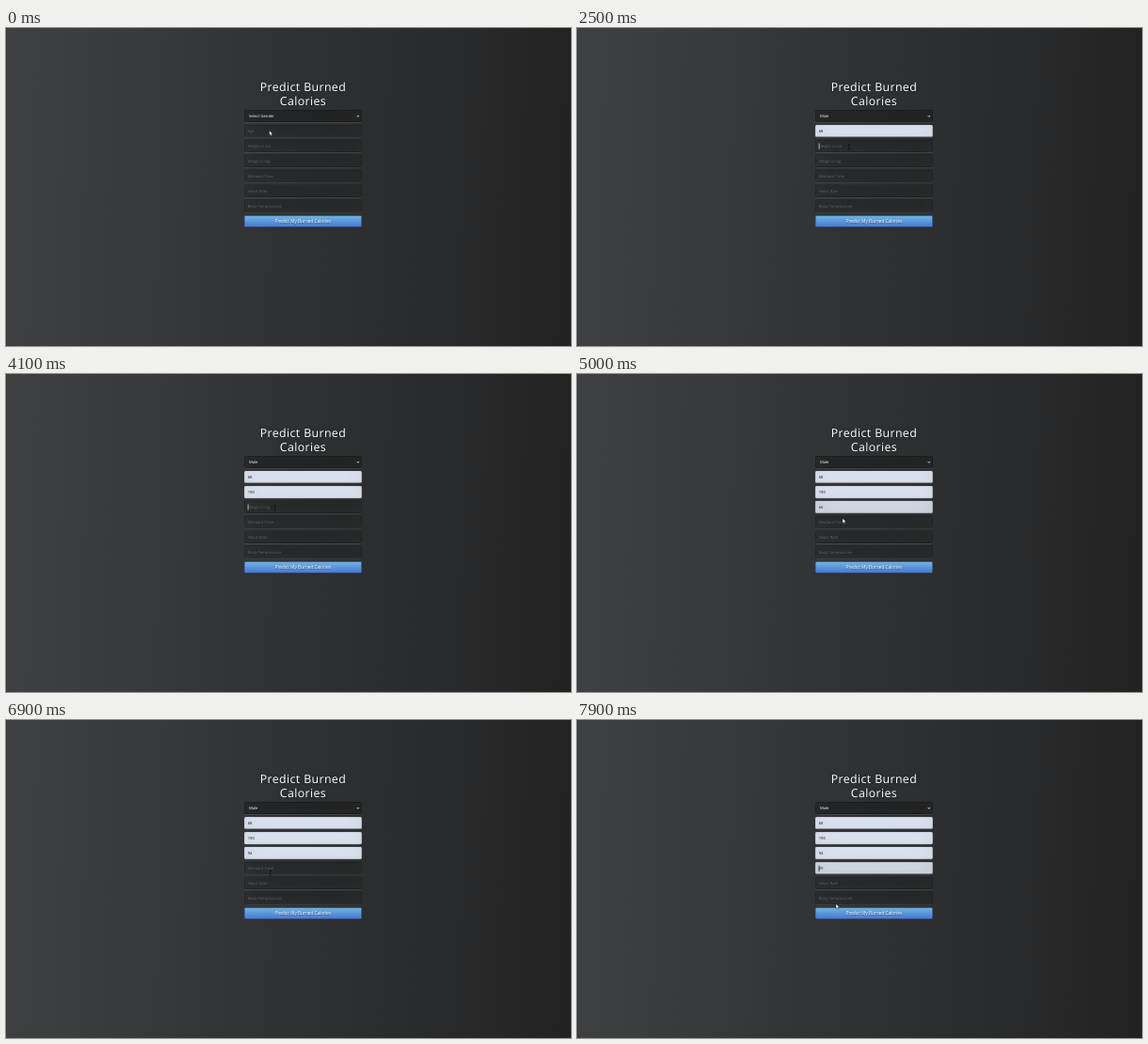
These frames come from a looping animation (600x338 px, 8000 ms). An HTML page:

```html
<!DOCTYPE html>
<html lang="en">
<head>
<meta charset="utf-8">
<title>Predict Burned Calories</title>
<style>
html, body { margin: 0; width: 100%; height: 100%; overflow: hidden; }
body {
  background: linear-gradient(92deg, #3f4042, #38393b 25%, #2f3133 50%, #2a2b2c 75%, #222223);
  font-family: "Open Sans", sans-serif;
}
/* The page is laid out at 1440 wide and shown at 600. */
#page {
  position: absolute; left: 0; top: 0; width: 1440px; height: 811px;
  transform: scale(.4166667); transform-origin: 0 0;
  text-rendering: geometricPrecision;
}
h1 {
  position: absolute; left: 607px; top: 130.5px; width: 300px; margin: 0;
  font-size: 29.5px; line-height: 36px; font-weight: 400; letter-spacing: 1px;
  text-align: center; white-space: nowrap; color: #fff;
  text-shadow: 0 0 10px rgba(0,0,0,.3);
}
.field, button {
  position: absolute; left: 607px; width: 300px; height: 31.5px;
  box-sizing: border-box; border: 1px solid rgba(0,0,0,.3); border-radius: 4px;
}
.field {
  display: flex; align-items: center; padding: 1px 8px 0;
  font-size: 10px; color: #626264; background: rgba(0,0,0,.3);
  box-shadow: inset 0 -5px 45px rgba(100,100,100,.2), 0 1px 1px rgba(255,255,255,.2);
}
.field.select { color: #fff; font-weight: 500; padding-left: 11px; background: rgba(0,0,0,.42); }
.field.preview { background: #dbe2ee; color: #252b36; }
.field.filled { background: #e8f0fe; color: #15181d; }
.caret { position: absolute; left: 8px; top: 8px; width: 1.6px; height: 15px; background: #c4c4c6; }
.preview .caret { background: #20242c; }
.chevron { position: absolute; right: 5px; top: 12px; width: 8px; height: 6px; }
button {
  top: 477.5px; height: 30px; padding: 0; border-color: #3762bc;
  background: linear-gradient(#6eb6de, #4a77d4); color: #fff;
  font: 11.3px "Open Sans", sans-serif;
  text-shadow: 1px 1px 1px rgba(0,0,0,.4);
  box-shadow: inset 0 1px 0 rgba(255,255,255,.2), 0 1px 2px rgba(0,0,0,.3);
}
#pointer { position: absolute; left: 0; top: 0; width: 1px; height: 1px; overflow: visible; }
</style>
</head>
<body>
<div id="page">
  <h1>Predict Burned<br>Calories</h1>
  <button type="button" tabindex="-1">Predict My Burned Calories</button>
  <svg id="pointer">
    <path id="arrow" d="M0 0V12L2.8 9.5L4.8 14L7 13L5 8.7H8.6Z" fill="#fff" stroke="#111" stroke-width=".9"/>
    <path id="beam" d="M-2.5 -6.5H2.5M0 -6.5V6.5M-2.5 6.5H2.5" fill="none" stroke="#090909" stroke-width="1.4"/>
  </svg>
</div>
<script>
const LOOP = 8000, STEP = 100;
const page = document.getElementById('page');
const pointer = document.getElementById('pointer');
const arrow = document.getElementById('arrow');
const beam = document.getElementById('beam');

const labels = ['Select Gender', 'Age', 'Height in cm', 'Weight in kg',
  'Workout Time', 'Heart Rate', 'Body Temperature'];

// [time, field, text, look]
const edits = [
  [300, 0, 'Male', ''],
  [900, 1, '56', 'preview'], [1100, 1, '68', 'preview'], [1300, 1, '68', 'filled'],
  [2800, 2, '190', 'preview'], [3200, 2, '190', 'filled'],
  [4800, 3, '66', 'preview'], [5200, 3, '94', 'preview'], [5400, 3, '94', 'filled'],
  [7200, 4, '29', 'preview']
];

// [from, to, field]
const carets = [[600, 1300, 1], [2300, 2800, 2], [4100, 4700, 3], [6300, 6700, 4], [7200, 8000, 4]];

// [time, x, y, shape] in stage pixels
const path = [
  [0, 279.7, 109, 'arrow'], [200, 279.7, 109, 'arrow'], [300, 274, 112, 'beam'],
  [600, 274, 112, 'beam'], [700, 272, 112, 'beam'],
  [900, 270, 116, 'arrow'], [1000, 267.3, 126, 'arrow'], [1300, 265, 151, 'arrow'],
  [1700, 265, 151, 'arrow'], [2100, 282, 132, 'arrow'], [2300, 288.8, 126.4, 'beam'],
  [2600, 288.8, 126.4, 'beam'], [2700, 286, 140, 'arrow'], [3000, 275, 200, 'arrow'],
  [3200, 275, 173, 'arrow'], [3300, 285.6, 142.4, 'beam'],
  [4700, 285.6, 142.4, 'beam'], [4800, 284, 148, 'arrow'], [5000, 282, 153.4, 'arrow'],
  [5300, 277, 188, 'arrow'], [5800, 277, 188, 'arrow'], [6000, 280, 172, 'arrow'],
  [6100, 280.7, 163, 'beam'], [6900, 280.7, 163, 'beam'], [7000, 281, 172, 'arrow'],
  [7400, 284, 213, 'arrow'], [7700, 284.5, 201, 'arrow'], [7900, 275, 195.4, 'arrow']
];

const fields = labels.map((label, i) => {
  const box = document.createElement('div');
  box.style.top = 208.5 + i * 38.3 + 'px';
  const text = document.createElement('span');
  const caret = document.createElement('i');
  caret.className = 'caret';
  box.append(text, caret);
  if (!i) box.insertAdjacentHTML('beforeend',
    '<svg class="chevron"><path d="M1 1L4 4.4L7 1" fill="none" stroke="#fff" stroke-width="1.8"/></svg>');
  page.insertBefore(box, pointer);
  return { box, text, caret };
});

function pointerAt(t) {
  let i = path.length - 1;
  while (i && path[i][0] > t) i--;
  const a = path[i], b = path[i + 1] || a;
  const k = b === a ? 0 : (t - a[0]) / (b[0] - a[0]);
  return { x: a[1] + (b[1] - a[1]) * k, y: a[2] + (b[2] - a[2]) * k, shape: a[3] };
}

function draw(t) {
  fields.forEach(({ box, text, caret }, i) => {
    const edit = edits.filter(e => e[1] === i && e[0] <= t).pop();
    box.className = 'field ' + (i ? '' : 'select ') + (edit ? edit[3] : '');
    text.textContent = edit ? edit[2] : labels[i];
    const on = carets.some(([from, to, field]) => field === i && t >= from && t < to);
    caret.style.display = on ? '' : 'none';
  });
  const p = pointerAt(t);
  pointer.style.transform = `translate(${p.x * 2.4}px, ${p.y * 2.4}px)`;
  arrow.style.display = p.shape === 'arrow' ? '' : 'none';
  beam.style.display = p.shape === 'beam' ? '' : 'none';
}

const start = performance.now();
let last = -1;
function tick() {
  const t = Math.floor((performance.now() - start) % LOOP / STEP) * STEP;
  if (t !== last) draw(last = t);
  requestAnimationFrame(tick);
}
tick();
</script>
</body>
</html>
```
